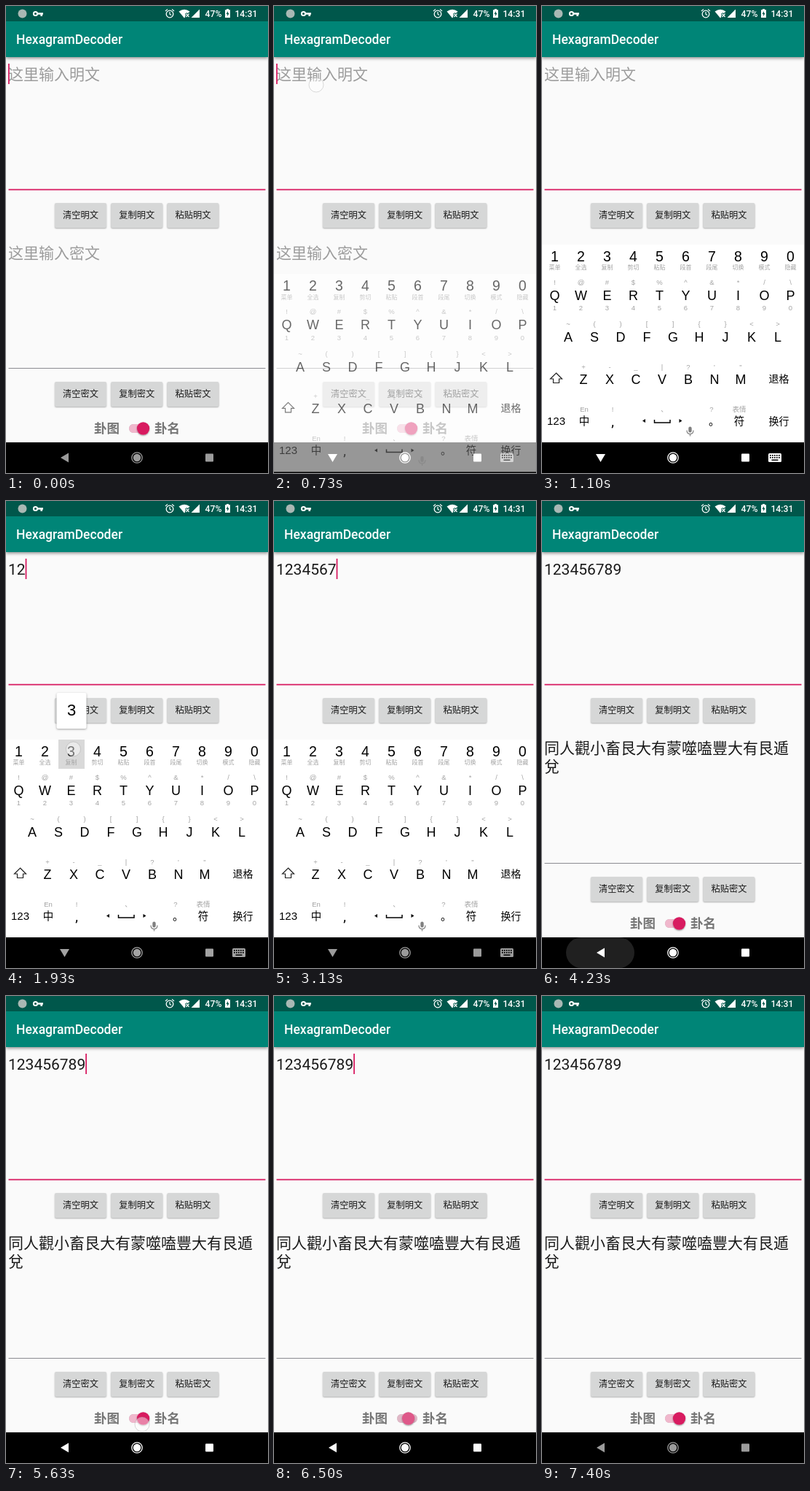
Write an HTML page with a canvas that moves like this. It is 360x640 px and loops after 7.43 s.

```html
<!DOCTYPE html>
<html lang="zh-Hans">
<head>
<meta charset="utf-8">
<title>HexagramDecoder</title>
<style>
html, body { margin: 0; width: 100%; height: 100%; overflow: hidden; background: #000; }
canvas { display: block; width: 360px; height: 640px; }
</style>
</head>
<body>
<canvas id="stage"></canvas>
<script>
const LOOP = 7430;
const FONT = 'Roboto, "Noto Sans CJK SC", sans-serif';
const KEY_FONT = '"Liberation Sans", "Noto Sans CJK SC", sans-serif';
const PRIMARY = '#008577', DARK = '#00574b', ACCENT = '#d81b60';
const PAPER = '#fafafa', BOARD = '#fff', INK = '#1a1a1a', HINT = '#9c9c9c', PALE = '#a3a3a3';
const CIPHER = ['同人觀小畜艮大有蒙噬嗑豐大有艮遁', '兌'];
const HEXAGRAMS = '䷌䷓䷈䷳䷍䷃䷔䷶䷍䷳䷠䷹';
const FIRST_KEY = 1350, KEY_STEP = 268, KEY_HOLD = 125;
const CURSOR_ON = [[0, 100], [570, 1100], [1475, 3990], [4500, 5000], [5500, 6000], [6500, 7000]];

const canvas = document.getElementById('stage');
const ctx = canvas.getContext('2d');
const dpr = window.devicePixelRatio || 1;
canvas.width = 360 * dpr;
canvas.height = 640 * dpr;

const clamp = v => Math.max(0, Math.min(1, v));
const ramp = (t, from, to) => clamp((t - from) / (to - from));
const smooth = p => p * p * (3 - 2 * p);

function rect(x, y, w, h, color, r = 0) {
  ctx.fillStyle = color;
  ctx.beginPath();
  ctx.roundRect(x, y, w, h, r);
  ctx.fill();
}

function circle(x, y, r, color, line = 0) {
  ctx.beginPath();
  ctx.arc(x, y, r, 0, 7);
  ctx.fillStyle = ctx.strokeStyle = color;
  ctx.lineWidth = line;
  line ? ctx.stroke() : ctx.fill();
}

function path(d, color, line = 0) {
  const p = new Path2D(d);
  ctx.fillStyle = ctx.strokeStyle = color;
  ctx.lineWidth = line;
  line ? ctx.stroke(p) : ctx.fill(p);
}

function text(str, x, y, size, color, align = 'left', weight = 400, font = FONT) {
  ctx.font = `${weight} ${size}px ${font}`;
  ctx.textAlign = align;
  ctx.fillStyle = color;
  ctx.fillText(str, x, y);
}

// Text centred on a point
const label = (str, x, y, size, color, font = FONT) =>
  text(str, x, y + size * .36, size, color, 'center', 400, font);

function shadowed(blur, dy, alpha, draw) {
  ctx.save();
  ctx.shadowColor = `rgba(0,0,0,${alpha})`;
  ctx.shadowBlur = blur * dpr;
  ctx.shadowOffsetY = dy * dpr;
  draw();
  ctx.restore();
}

function faded(alpha, draw) {
  if (alpha <= 0) return;
  ctx.save();
  ctx.globalAlpha = alpha;
  draw();
  ctx.restore();
}

function statusBar() {
  shadowed(4, 1.5, .4, () => rect(0, 21, 360, 49, PRIMARY));
  rect(0, 0, 360, 21, DARK);
  circle(22.5, 10.5, 6, '#a9b8b4');
  circle(40.5, 10.5, 2.6, '#fff', 2);
  path('M43 9.3h8v2.4h-1v2.3h-2.6v-2.3H43z', '#fff');
  circle(225, 11, 4.8, '#fff', 1.3);
  path('M225 8v3.2l2.2 1.4M219 7l3-2.6M231 7l-3-2.6', '#fff', 1.2);
  path('M237.5 7.5Q245 2 252.5 7.5L245 16.5z', '#fff');
  path('M247 10l4.5 5M251.5 10l-4.5 5', DARK, 3);
  path('M247.5 10.5l4 4.5M251.5 10.5l-4 4.5', '#fff', 1.2);
  path('M266 4.5v11.5h-11.5z', '#fff');
  text('47%', 273.5, 15, 12.25, '#fff', 'left', 500);
  path('M303 4h3v1.3h2V16h-7V5.3h2z', '#fff');
  path('M305 7l-2.5 4h1.6v3l2.6-4.2H305z', DARK);
  text('14:31', 345.5, 15, 12.25, '#fff', 'right', 500);
  text('HexagramDecoder', 14, 52, 17.5, '#fff', 'left', 500);
}

function buttons(y, noun) {
  ['清空', '复制', '粘贴'].forEach((verb, i) => {
    const x = 67 + 77.2 * i;
    shadowed(2, 1, .3, () => rect(x, y, 71, 34, '#d6d7d7', 2));
    label(verb + noun, x + 35.5, y + 17, 12.25, INK);
  });
}

function toggle(on) {
  text('卦图', 121, 585, 17.5, '#757575', 'left', 700);
  text('卦名', 204, 585, 17.5, '#757575', 'left', 700);
  rect(169, 573, 28, 12, '#b9b9b9', 6);
  faded(on, () => rect(169, 573, 28, 12, '#f0b7cc', 6));
  const x = 175 + 13.5 * on;
  shadowed(2, 1, .4, () => circle(x, 579, 8.7, '#ececec'));
  faded(on, () => circle(x, 579, 8.7, ACCENT));
}

function app(t) {
  const typed = Math.max(0, Math.min(9, Math.floor((t - FIRST_KEY - KEY_HOLD) / KEY_STEP) + 1));
  const plain = '123456789'.slice(0, typed);
  rect(0, 70, 360, 528, PAPER);
  statusBar();

  if (plain) text(plain, 3, 101, 21, INK);
  else text('这里输入明文', 3, 101, 21, HINT);
  if (CURSOR_ON.some(([a, b]) => t >= a && t < b)) {
    ctx.font = `21px ${FONT}`;
    rect(3 + ctx.measureText(plain).width, 79, 1.8, 28, ACCENT);
  }
  rect(3.5, 250.7, 353, 1.8, ACCENT);
  buttons(270, '明文');

  if (typed < 9) text('这里输入密文', 3, 346, 21, HINT);
  else if (t > 5760 && t < 6360) text(HEXAGRAMS, 3, 346, 21, INK, 'left', 400, '"DejaVu Sans", sans-serif');
  else CIPHER.forEach((row, i) => text(row, 3, 346 + 24.6 * i, 21, INK));
  rect(3.5, 496, 353, 1, '#8c8c92');
  buttons(515, '密文');
  toggle(1 - smooth(ramp(t, 5740, 5990)) + smooth(ramp(t, 6340, 6590)));
}

function keyRow(keys, x, y, size, hints, hintDy, hintSize = 9.5) {
  [...keys].forEach((key, i) => {
    label(key, x + 36 * i, y, size, '#000', KEY_FONT);
    label(hints[i], x + 36 * i, y + hintDy, hintSize, PALE, KEY_FONT);
  });
}

function keyboard(pressed) {
  rect(0, 327, 360, 271, BOARD);
  if (pressed >= 0) rect(36 * pressed, 327, 36, 40, '#d9d9d9');
  const edits = '菜单 全选 复制 剪切 粘贴 段首 段尾 切换 模式 隐藏'.split(' ');
  keyRow('1234567890', 17.5, 342.5, 19.5, edits, 16, 8);
  keyRow('QWERTYUIOP', 17.5, 396.5, 18, '!@#$%^&*/\\', -18);
  [...'1234567890'].forEach((d, i) => label(d, 17.5 + 36 * i, 414, 9.5, PALE, KEY_FONT));
  keyRow('ASDFGHJKL', 36, 454, 18, '~()[]{}<>', -18);
  keyRow('ZXCVBNM', 57, 511.5, 18, '+-_|?\'"', -17);
  path('M19.5 503l8 8h-4v5.5h-8V511h-4z', '#222', 1.2);
  label('退格', 325.5, 511, 14, '#000');

  label('123', 19.5, 568.5, 15, '#000', KEY_FONT);
  label('中', 58, 568.5, 14.5, '#000');
  label(',', 97, 569, 19, '#000');
  path('M154.5 567v4h21.5v-4', '#000', 1.5);
  path('M142 566v5l-4-2.5zM188.5 566v5l4-2.5z', '#000');
  text('。', 229, 573.5, 15, '#000');
  label('符', 271, 568.5, 14.5, '#000');
  label('换行', 325.5, 568.5, 14, '#000');
  [['En', 58], ['!', 97], ['、', 168], ['?', 233], ['表情', 271]]
    .forEach(([hint, x]) => label(hint, x, 552.5, 9.5, PALE, KEY_FONT));
  rect(201.3, 576.5, 4.4, 8, '#808080', 2.2);
  path('M199 581.5q0 5 4.5 5t4.5-5M203.5 586.5v3', '#808080', 1.2);
}

function popup(key) {
  const x = Math.max(0, 36 * key - 2.5);
  shadowed(3, 1, .35, () => rect(x, 263, 41, 49, BOARD, 2));
  label(key + 1, x + 20.5, 286.5, 22, '#000', KEY_FONT);
}

function navIcons(t, open, shown) {
  const bright = ramp(t, 570, 700) - ramp(t, 1100, 2000) + ramp(t, 3970, 4050) - ramp(t, 6450, 7400);
  const level = Math.round(155 + 100 * bright);
  const color = `rgb(${level},${level},${level})`;
  path(open ? 'M74 614h13l-6.5 11z' : 'M86 612.5v13l-11-6.5z', color);
  circle(180, 619, 7.2, color, 1.3);
  circle(180, 619, 5.2, color);
  rect(274, 613.5, 11, 11, color, 1);
  if (open) faded(shown, () => {
    rect(311, 613, 18, 12, color, 1.5);
    for (let i = 0; i < 10; i++) rect(313 + 3 * (i % 5), 615 + 3 * Math.floor(i / 5), 1.7, 1.7, '#000');
    rect(315.5, 621.5, 9, 1.5, '#000');
  });
}

function touch(t, x, y, from, to) {
  const alpha = ramp(t, from - 20, from + 20) * (1 - ramp(t, to, to + 45));
  faded(alpha, () => {
    circle(x, y, 10, 'rgba(255,255,255,.45)');
    circle(x, y, 10, 'rgba(150,150,150,.35)', 1);
  });
}

function draw(t) {
  ctx.setTransform(dpr, 0, 0, dpr, 0, 0);
  app(t);
  rect(0, 598, 360, 42, '#000');
  const ripple = ramp(t, 3970, 4100) * (1 - ramp(t, 4200, 4530));
  faded(ripple, () => rect(33, 598, 94, 42, '#242424', 21));

  const leave = ramp(t, 4050, 4200);
  const shown = ramp(t, 645, 790) * (1 - leave);
  const shift = 80 * (1 - ramp(t, 650, 930)) ** 2 + 54 * leave ** 2;
  const index = Math.floor((t - FIRST_KEY) / KEY_STEP);
  const held = index >= 0 && index < 9 && (t - FIRST_KEY) % KEY_STEP < KEY_HOLD;
  const pressed = held ? index : -1;
  faded(shown, () => {
    ctx.translate(0, shift);
    keyboard(pressed);
  });
  if (held) popup(pressed);
  navIcons(t, t > 650 && t < 4120, shown);

  touch(t, 58, 108, 590, 730);
  for (let i = 0; i < 9; i++) {
    const start = FIRST_KEY + KEY_STEP * i;
    touch(t, 20.5 + 36 * i, 340, start, start + KEY_HOLD);
  }
  touch(t, 80, 619, 3990, 4090);
  touch(t, 187, 587, 5580, 5720);
  touch(t, 187, 587, 6220, 6350);
}

function loop() {
  draw(performance.now() % LOOP);
  requestAnimationFrame(loop);
}
loop();
</script>
</body>
</html>
```
